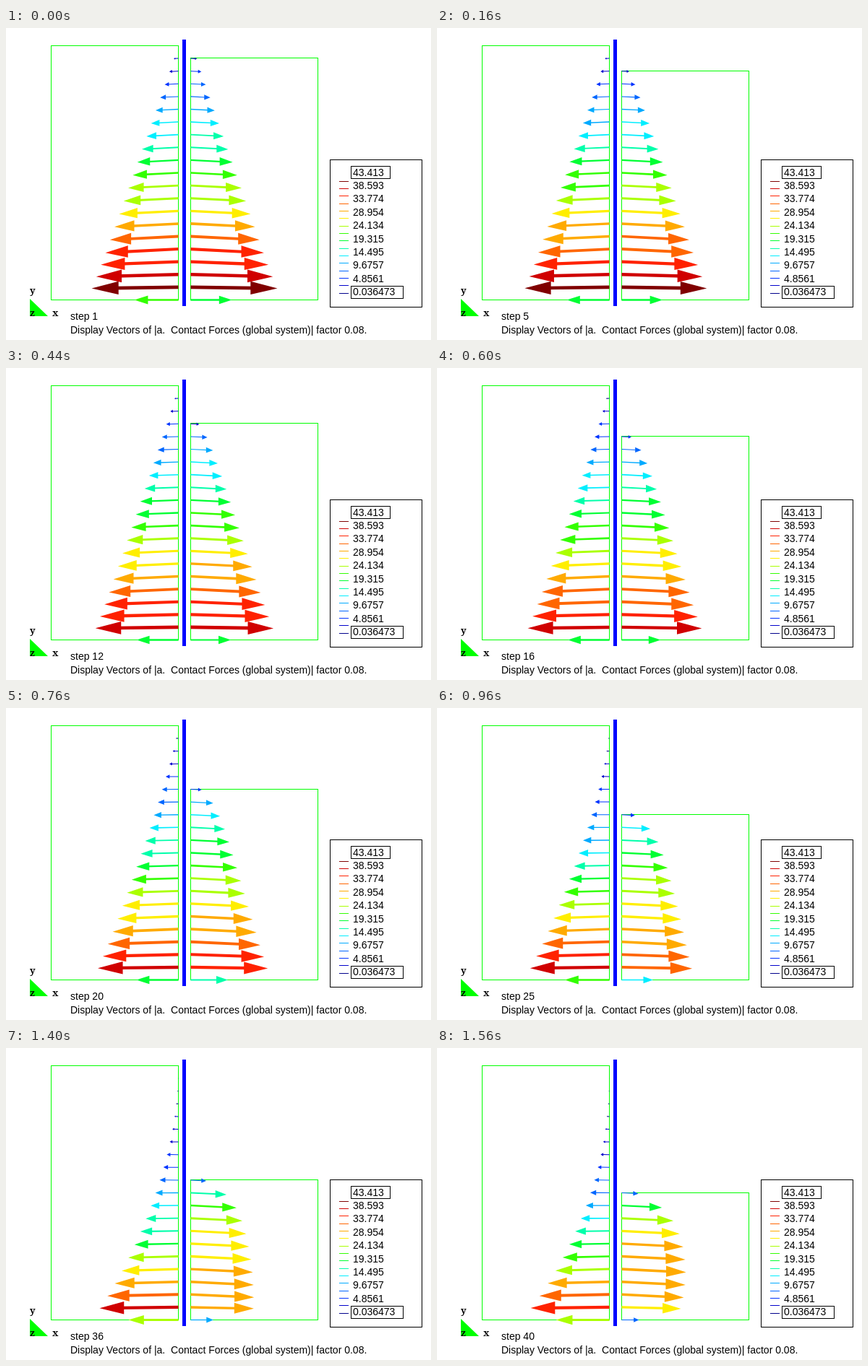
These frames come from a looping animation (588 by 432 pixels, 1.6 s). An HTML page with a canvas:

```html
<!DOCTYPE html>
<html>
<head>
<meta charset="utf-8">
<style>
html, body { margin: 0; overflow: hidden; background: #fff; }
canvas { display: block; }
</style>
</head>
<body>
<canvas id="stage" width="588" height="432"></canvas>
<script>
const ctx = document.getElementById('stage').getContext('2d');
const COLORS = ('#00008c #0000cc #0033ff #0066ff #00aaff #00eeff #00ffaa #00ff33 ' +
  '#33ff00 #aaff00 #ffee00 #ffaa00 #ff6600 #ff2200 #d00000 #800000').split(' ');
const LABELS = '43.413 38.593 33.774 28.954 24.134 19.315 14.495 9.6757 4.8561 0.036473'.split(' ');
const GREEN = '#00ff00';
const BOTTOM = 20;
const STAGES = 10;

const nodeY = k => 24 + 17.6 * k;

function line(color, width, ...points) {
  ctx.strokeStyle = color;
  ctx.lineWidth = width;
  ctx.beginPath();
  points.forEach(([x, y]) => ctx.lineTo(x, y));
  ctx.stroke();
}

function polygon(color, ...points) {
  ctx.fillStyle = color;
  ctx.beginPath();
  points.forEach(([x, y]) => ctx.lineTo(x, y));
  ctx.fill();
}

function frame(color, x, y, w, h) {
  ctx.strokeStyle = color;
  ctx.lineWidth = 1;
  ctx.strokeRect(x + 0.5, y + 0.5, w, h);
}

function text(string, x, y, font = '14px "Liberation Sans", Arial, sans-serif') {
  ctx.font = font;
  ctx.fillStyle = '#000';
  ctx.fillText(string, x, y);
}

// The retained side turns from a linear to a convex pressure profile.
function leftLength(k, progress) {
  if (k === BOTTOM) return 61 - 22 * progress + 35 * progress ** 2;
  const deepest = 109 + 11 * (1 - progress) ** 2.5;
  return deepest * (k / 19) ** (1 + 1.2 * progress ** 2.3);
}

// The excavated side bulges and drops off sharply near its surface.
function rightLength(k, top, progress) {
  if (k === BOTTOM) return 57 - 33 * progress ** 2.2;
  const depth = k - top;
  const x = depth / (19 - top);
  const dip = 38 * progress;
  const shallow = 8.6 + 14.4 * progress + dip;
  const deep = 120 - 38 * progress ** 1.3;
  const bulge = 64 * progress ** 4 * x * (1 - x);
  return shallow + (deep - shallow) * x + bulge - dip * Math.exp(-depth);
}

function arrow(x, k, length, direction, tilt) {
  const color = COLORS[Math.min(15, Math.floor((length + 3.25) / 8.02))];
  const half = 0.45 * length ** 0.63;
  ctx.save();
  ctx.translate(x, nodeY(k) + 0.5);
  ctx.transform(direction, tilt, 0, 1, 0, 0);
  line(color, Math.max(1, length * 0.04), [0, 0], [length * 0.75, 0]);
  polygon(color, [length, 0], [length * 0.69, -half], [length * 0.69, half]);
  ctx.restore();
}

function drawArrows(top) {
  const progress = (top - 1) / (STAGES - 1);
  for (let k = 1; k <= BOTTOM; k++) {
    const up = BOTTOM - k;
    const leftTilt = 0.05 * Math.min(1, up / 4) * (1 - progress * up / 9);
    arrow(238.5, k, leftLength(k, progress), -1, leftTilt);
    if (k < top) continue;
    const rightTilt = 0.05 * Math.min(1, up / (4 - 2 * progress));
    arrow(255.5, k, rightLength(k, top, progress), 1, rightTilt);
  }
}

function drawLegend() {
  frame('#000', 448, 182, 127, 204);
  frame('#000', 477, 191, 54, 17);
  frame('#000', 477, 357, 72, 17);
  LABELS.forEach((label, i) => text(label, 480, Math.floor(205.27 + 18.35 * i)));
  COLORS.forEach((color, i) => {
    const y = Math.floor(367 - 10.33 * i) + 0.5;
    line(color, 1, [461, y], [474, y]);
  });
}

function drawAxes() {
  const font = 'bold 13px "Noto Serif", serif';
  polygon(GREEN, [33, 375], [33, 399], [58, 399]);
  text('y', 33, 368, font);
  text('z', 33, 399, font);
  text('x', 64, 399, font);
}

function draw(now) {
  const step = Math.floor(now % 1600 / 40) + 1;
  const top = Math.ceil(step / 4);
  const topY = Math.floor(nodeY(top));
  ctx.fillStyle = '#fff';
  ctx.fillRect(0, 0, 588, 432);

  frame(GREEN, 62, 24, 176, 352);
  frame(GREEN, 255, topY, 176, 376 - topY);
  drawArrows(top);
  ctx.fillStyle = '#0000ff';
  ctx.fillRect(244, 16, 5, 369);

  drawLegend();
  drawAxes();
  text('step ' + step, 89, 404);
  text('Display Vectors of |a.  Contact Forces (global system)| factor 0.08.', 89, 423);
}

const start = performance.now();
function tick() {
  draw(performance.now() - start);
  requestAnimationFrame(tick);
}
tick();
</script>
</body>
</html>
```
